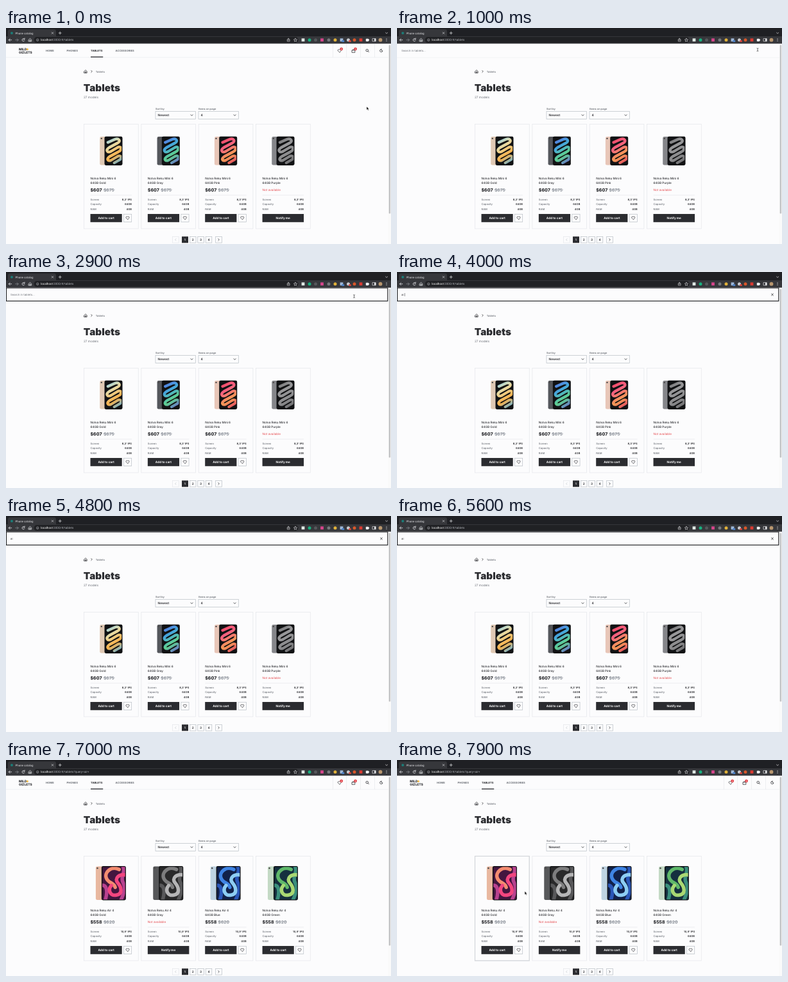
An HTML page for the animation above (8 s loop, 600 by 338 pixels).

```html
<!DOCTYPE html>
<html lang="en">
<head>
<meta charset="utf-8">
<title>Phone catalog</title>
<style>
  html, body { margin: 0; width: 100%; height: 100%; overflow: hidden; background: #fcfcfd; }
  svg { display: block; }
  #stage { width: 100vw; height: 100vh; }
  text { font-family: Inter, sans-serif; white-space: pre; text-rendering: geometricPrecision; }
  .ui { font-family: Roboto, sans-serif; }
</style>
</head>
<body>
<svg id="stage" viewBox="0 0 600 338"></svg>
<script>
const INK = '#2b2c30', GRAY = '#6b6f76', LINE = '#e4e6ea', EDGE = '#b8bfc5', PAGE = '#fcfcfd';

const rect = (x, y, w, h, fill, more = '') =>
  `<rect x="${x}" y="${y}" width="${w}" height="${h}" fill="${fill}" ${more}/>`;
const box = (x, y, w, h, stroke = EDGE, width = .7) =>
  rect(x, y, w, h, PAGE, `stroke="${stroke}" stroke-width="${width}"`);
const dot = (x, y, r, fill) => `<circle cx="${x}" cy="${y}" r="${r}" fill="${fill}"/>`;
const path = (d, stroke = INK, width = .8, more = '') =>
  `<path d="${d}" fill="none" stroke="${stroke}" stroke-width="${width}" stroke-linecap="round" stroke-linejoin="round" ${more}/>`;
const text = (x, y, s, size, weight = 400, fill = INK, more = '') =>
  `<text x="${x}" y="${y}" font-size="${size}" font-weight="${weight}" fill="${fill}" ${more}>${s}</text>`;
const group = (id, s) => `<g id="${id}">${s}</g>`;
const middle = 'text-anchor="middle"', end = 'text-anchor="end"';

const heart = (x, y) =>
  path(`M${x} ${y + 2.4}l-2.3-2.3a1.4 1.4 0 0 1 2.3-1.7a1.4 1.4 0 0 1 2.3 1.7z`, INK, .7);
const cross = (x, y, r, color, width) =>
  path(`M${x - r} ${y - r}l${2 * r} ${2 * r}m0 ${-2 * r}l${-2 * r} ${2 * r}`, color, width);
const chevron = (x, y) => path(`M${x - 1.5} ${y - .8}l1.5 1.6l1.5-1.6`, INK, .8);
const arrow = (x, y, dir, color = INK) => path(`M${x - dir * .7} ${y - 1.5}l${dir * 1.5} 1.5l${-dir * 1.5} 1.5`, color, .75);
const house = (x, y, color) =>
  path(`M${x - 2.2} ${y - .3}l2.2-2l2.2 2v2.6h-4.4zM${x - .7} ${y + 2.2}v-1.9h1.4v1.9`, color, .75);

function browser() {
  const light = '#e2e3e6';
  const icons = [[463, '#dfe8e4', 1], [473, '#18b07f'], [482.5, '#55585b'], [492.5, '#d6458c', 1],
    [503, '#77797d'], [513, '#e0b13a'], [523, '#9fb8d9', 1], [533.5, '#c9cbd0'], [543, '#d8572a'], [553, '#d93a31', 1]];
  return rect(0, 0, 600, 13.2, '#1f2024') +
    rect(3, 2.3, 75, 14, '#36373b', 'rx="3"') +
    rect(0, 13, 600, 11.5, '#36373b') +
    dot(9, 7.9, 2, '#1c7d78') +
    text(14.5, 9.6, 'Phone catalog', 4.4, 400, '#e4e5e8', 'class="ui"') +
    cross(72.5, 7.9, 1.3, light, .65) +
    path('M82.2 7.9h4m-2-2v4', light, .75) +
    path('M591.5 7.2l1.6 1.5l1.6-1.5', light, .7) +
    path('M8.7 18.7h-4.5m2-2l-2 2l2 2', light, .8) +
    path('M14.7 18.7h4.5m-2-2l-2 2l2 2'.replace('m-2-2l-2 2l2 2', 'm-2-2l2 2l-2 2'), '#85888d', .8) +
    path('M28.8 17.4a2.1 2.1 0 1 0 .2 2.3m0-3.8v2h-2', light, .8) +
    house(37.5, 18.6, light) +
    rect(43.5, 14.1, 412, 9.2, '#202124', 'rx="4.6"') +
    `<circle cx="49.2" cy="18.7" r="1.8" fill="none" stroke="#c0c3c8" stroke-width=".55"/>` +
    path('M49.2 18.5v1', '#c0c3c8', .55) +
    `<text class="ui" x="54" y="20.4" font-size="4.65" fill="#b0b3b9"><tspan fill="#fff">localhost</tspan>:3000/#/tablets<tspan id="query"></tspan></text>` +
    path('M439.3 17.9h-1v3h3.8v-3h-1m-.9 1.6v-3.4m-1 1l1-1l1 1', light, .6) +
    path('M451 16.2l.8 1.7l1.9.2l-1.5 1.3l.4 1.8l-1.6-.9l-1.6.9l.4-1.8l-1.5-1.3l1.9-.2z', light, .6) +
    icons.map(([x, c, square]) => square ? rect(x - 2.4, 16.3, 4.8, 4.8, c) : dot(x, 18.7, 2.5, c)).join('') +
    rect(523.3, 19.2, 3.9, 2.8, '#4b7fc4') + rect(534.3, 19.2, 3.4, 2.8, '#d8433b') +
    rect(560.8, 16.7, 4.3, 4.3, '#f0f1f3', 'rx=".7"') + dot(565.2, 18.7, 1, '#f0f1f3') +
    path('M571.4 16.6h4.8v4.2h-4.8z', light, .7) + rect(574, 16.6, 2.2, 4.2, light) +
    dot(583.5, 18.7, 2.9, '#b9976f') +
    [16.9, 18.7, 20.5].map(y => dot(593, y, .55, light)).join('');
}

function header() {
  const nav = [[62, 'HOME'], [94.5, 'PHONES'], [132, 'TABLETS'], [170.5, 'ACCESSORIES']];
  const badge = (x, n) => dot(x, 32.8, 2.4, '#e2373f') + text(x, 34, n, 3, 700, '#fff', middle);
  return text(20, 35.2, 'MILD', 4.9, 800) + dot(33.3, 33.3, 1.5, '#efb53c') +
    text(20, 39.5, 'GIZLETS', 4.9, 800) +
    nav.map(([x, s]) => text(x, 36.9, s, 4.15, 700, s === 'TABLETS' ? INK : GRAY)).join('') +
    rect(132, 44.7, 19.2, 1.3, INK) +
    [509, 530.5, 552.3, 574].map(x => rect(x, 25, .6, 21, LINE)).join('') +
    heart(519.7, 35.7) + badge(522.7, 2) +
    path('M539.4 34.7h4.4v3.6h-4.4zm.9 0v-.7h2.6v.7', INK, .75) + badge(544.5, 2) +
    `<circle cx="562.7" cy="35" r="1.8" fill="none" stroke="${INK}" stroke-width=".8"/>` +
    path('M564.1 36.4l1.4 1.4', INK, .8) +
    path('M585 33.2a1.6 1.6 0 0 0 2 2.4a2.2 2.2 0 1 1-2-2.4z', INK, .75);
}

const search = () =>
  rect(0, 24.5, 595.5, 21.2, PAGE) +
  `<rect id="focus" x=".5" y="25" width="594.3" height="20.4" fill="none" stroke="#1c1d20" stroke-width="1.1"/>` +
  text(7, 37, '', 4.3, 400, GRAY, 'id="typed"') +
  rect(7, 33, .5, 5, INK, 'id="caret"') +
  group('clear', cross(585, 35.4, 1.4, INK, .85));

function select(x, label, value) {
  return text(x, 127.8, label, 4, 600, GRAY) + box(x, 130.4, 62.3, 12.2) +
    text(x + 3.6, 138.2, value, 4.8, 600) + chevron(x + 56.5, 136.5);
}

const catalog = () =>
  house(124, 68, INK) + arrow(133.5, 68, 1) + text(139.7, 69.5, 'Tablets', 4.1, 500, GRAY) +
  text(120.8, 99.2, 'Tablets', 15.3, 900) +
  text(121, 109.5, '27 models', 4.7, 400, GRAY) +
  select(233, 'Sort by', 'Newest') + select(300, 'Items on page', '4') +
  box(259.5, 326.5, 9.6, 9.6, LINE) + arrow(264.3, 331.3, -1, '#c3c8cd') +
  [1, 2, 3, 4].map(n => {
    const x = 261.6 + 12.4 * n, on = n === 1;
    return (on ? rect(x, 326.3, 10, 10, INK) : box(x, 326.5, 9.6, 9.6)) +
      text(x + 4.8, 333, n, 4.7, 600, on ? '#fff' : INK, middle);
  }).join('') +
  box(326.7, 326.5, 9.6, 9.6) + arrow(331.5, 331.3, 1) +
  rect(595.5, 24.5, 4.5, 313.5, '#fafafa') + rect(596.7, 26.5, 2.4, 264, '#c1c2c4', 'rx="1.2"');

function tablet(cx, big, back, colors, id) {
  const [l, top, w, h, lip] = big ? [cx - 14.8, 166, 38, 53.5, 9] : [cx - 10.2, 169.7, 28, 45.3, 7.3];
  const frame = rect(l - lip, top + .4, lip * 2.5, h - .8, back, 'rx="2.4"') +
    dot(l - lip + 2.6, top + 3.2, 1.2, '#4a4848') + rect(l, top, w, h, '#111214', 'rx="2.4"');
  const art = big
    ? rect(0, 0, 40, 54, colors[0]) +
      path('M-2 29C7 27 9 38 4 54M31-3C38 8 27 14 32 24S34 40 28 54', colors[3], 5.5) +
      path('M26 4C14-2 3 8 6 17S18 24 20 32', colors[2], 5.5) +
      path('M38 13C26 10 18 18 24 25S32 42 22 44S8 36 14 29', colors[1], 5.5)
    : `<linearGradient id="${id}" gradientUnits="userSpaceOnUse" x1="0" y1="2" x2="26" y2="40">` +
      colors.map((c, i) => `<stop offset="${i / (colors.length - 1)}" stop-color="${c}"/>`).join('') +
      '</linearGradient>' +
      path('M4 8L13 4C21 0 25 6 19 9L6 16C0 20 3 25 9 22L19 16C25 13 27 19 20 23L7 30C1 34 4 38 9 36L19 30C25 27 27 33 21 36L14 40',
        `url(#${id})`, 4.3);
  return frame + `<svg x="${l + 1.3}" y="${top + 1.3}" width="${w - 2.6}" height="${h - 2.6}">${art}</svg>`;
}

function card(item, i, big) {
  const [color, back, colors, sold] = item;
  const x = 121.5 + 89.35 * i, left = x + 10, right = x + 74.5;
  const specs = [['Screen', big ? "10,9' IPS" : "8,3' IPS"], ['Capacity', '64GB'], ['RAM', '4GB']];
  const [price, full] = big ? ['$558', '$620'] : ['$607', '$675'];
  return box(x, 150.5, 84.7, 163.5, LINE) +
    tablet(x + 42.2, big, back, colors, 'wave' + i) +
    text(left, 237, big ? 'Nolva Reku Air 4' : 'Nolva Reku Mini 6', 4.65, 500) +
    text(left, 243.6, '64GB ' + color, 4.65, 500) +
    (sold ? text(left, 254.8, 'Not available', 4.65, 400, '#e5484d')
      : text(left, 255.6, price, 7, 800) + text(left + 20.4, 255.6, full, 6.8, 600, '#8a9098') +
        rect(left + 20.2, 252.7, 17.8, .7, '#8a9098')) +
    rect(left, 261.2, 64.5, .6, LINE) +
    specs.map(([k, v], n) => text(left, 269.6 + 7.5 * n, k, 4.1, 500, GRAY) +
      text(right, 269.6 + 7.5 * n, v, 4.1, 600, INK, end)).join('') +
    rect(left, 291, sold ? 64.5 : 49.2, 12.8, INK) +
    text(left + (sold ? 32.2 : 24.6), 299.1, sold ? 'Notify me' : 'Add to cart', 4.7, 700, '#fff', middle) +
    (sold ? '' : box(right - 12.6, 291.3, 12.3, 12.2) + heart(right - 6.5, 297.2));
}

// colour, back, screen colours, sold out
const minis = [
  ['Gold', '#e0c9b4', ['#8bd3f2', '#e9d9a0', '#f6b04a', '#59b5ea']],
  ['Gray', '#55575c', ['#5a6fe0', '#45a5dc', '#5fd08c', '#6a62d8']],
  ['Pink', '#e8c6b8', ['#f0435f', '#f2607f', '#f49a55', '#e23f63']],
  ['Purple', '#85868a', ['#6f6f71', '#98989a', '#8a8a8c', '#6a6a6c'], true]];
const airs = [
  ['Gold', '#e9b8a0', ['#43163f', '#f2467f', '#f48c70', '#b8428f']],
  ['Gray', '#57585a', ['#29292a', '#b5b5b6', '#7d7d7e', '#58585a'], true],
  ['Blue', '#bfd4e2', ['#11214a', '#8dcdf3', '#3f84e4', '#2a57b8']],
  ['Green', '#c4dac5', ['#15303f', '#a9d873', '#5fb86a', '#3b8f7c']]];
const row = (items, big) => items.map((item, i) => card(item, i, big)).join('');

document.getElementById('stage').innerHTML =
  rect(0, 0, 600, 338, PAGE) + catalog() +
  group('minis', row(minis, false)) + group('airs', row(airs, true)) +
  '<rect id="hover" x="121.5" y="150.5" width="84.7" height="163.5" fill="none" stroke="#d3d6da" stroke-width="1.2"/>' +
  rect(0, 45.7, 595.5, .6, LINE) + group('header', header()) + group('search', search()) + browser() +
  '<path id="pointer" d="M0 0v5.2l1.3-1.1l.9 2l1-.5l-.9-1.9h1.6z" fill="#111" stroke="#fff" stroke-width=".4"/>' +
  path('M-1-2.4Q0-2.4 0-1.6V1.6Q0 2.4-1 2.4M1-2.4Q0-2.4 0-1.6M0 1.6Q0 2.4 1 2.4', '#222', .6, 'id="beam"');

const el = id => document.getElementById(id);
const show = (id, on) => el(id).setAttribute('visibility', on ? 'visible' : 'hidden');

const OPEN = 1000, FOCUS = 2000, RESULTS = 5900, CLOSE = 6900;
// time, text, caret position
const typing = [[FOCUS, '', 7], [3500, 'a', 10], [3900, 'ai', 11.8], [5700, 'air', 13.4]];
// time, x, y
const moves = [[100, 562, 123], [800, 562, 34], [1100, 562, 34], [1700, 542.5, 38], [3500, 542.5, 38],
  [7000, 520, 150], [7300, 230, 245], [7500, 199, 205.5], [8000, 199, 205.5]];

function place(t) {
  const i = moves.findIndex(m => m[0] > t);
  if (i < 1) return moves[0].slice(1);
  const [a, b] = [moves[i - 1], moves[i]];
  const p = (t - a[0]) / (b[0] - a[0]), e = p * p * (3 - 2 * p);
  return [a[1] + (b[1] - a[1]) * e, a[2] + (b[2] - a[2]) * e];
}

function draw(now) {
  const t = Math.floor(now % 8000 / 100) * 100;
  const open = t >= OPEN && t < CLOSE, focused = open && t >= FOCUS, found = t >= RESULTS;
  const key = typing.filter(k => k[0] <= t).pop() || [0, '', 7];
  show('header', !open);
  show('search', open);
  show('focus', focused);
  show('clear', open && key[1]);
  show('caret', focused && (t - key[0]) % 1000 < 500);
  el('caret').setAttribute('x', key[2]);
  el('typed').textContent = key[1] || 'Search in tablets...';
  el('typed').setAttribute('fill', key[1] ? INK : GRAY);
  show('typed', open);
  show('minis', !found);
  show('airs', found);
  el('query').textContent = found ? '?query=air+' : '';
  show('hover', t >= 7400);

  const [x, y] = place(t), seen = t < 3500 || t > 7000;
  const beam = open && y < 46;
  show('pointer', seen && !beam);
  show('beam', seen && beam);
  for (const id of ['pointer', 'beam']) el(id).setAttribute('transform', `translate(${x} ${y})`);
  requestAnimationFrame(draw);
}
requestAnimationFrame(draw);
</script>
</body>
</html>
```
